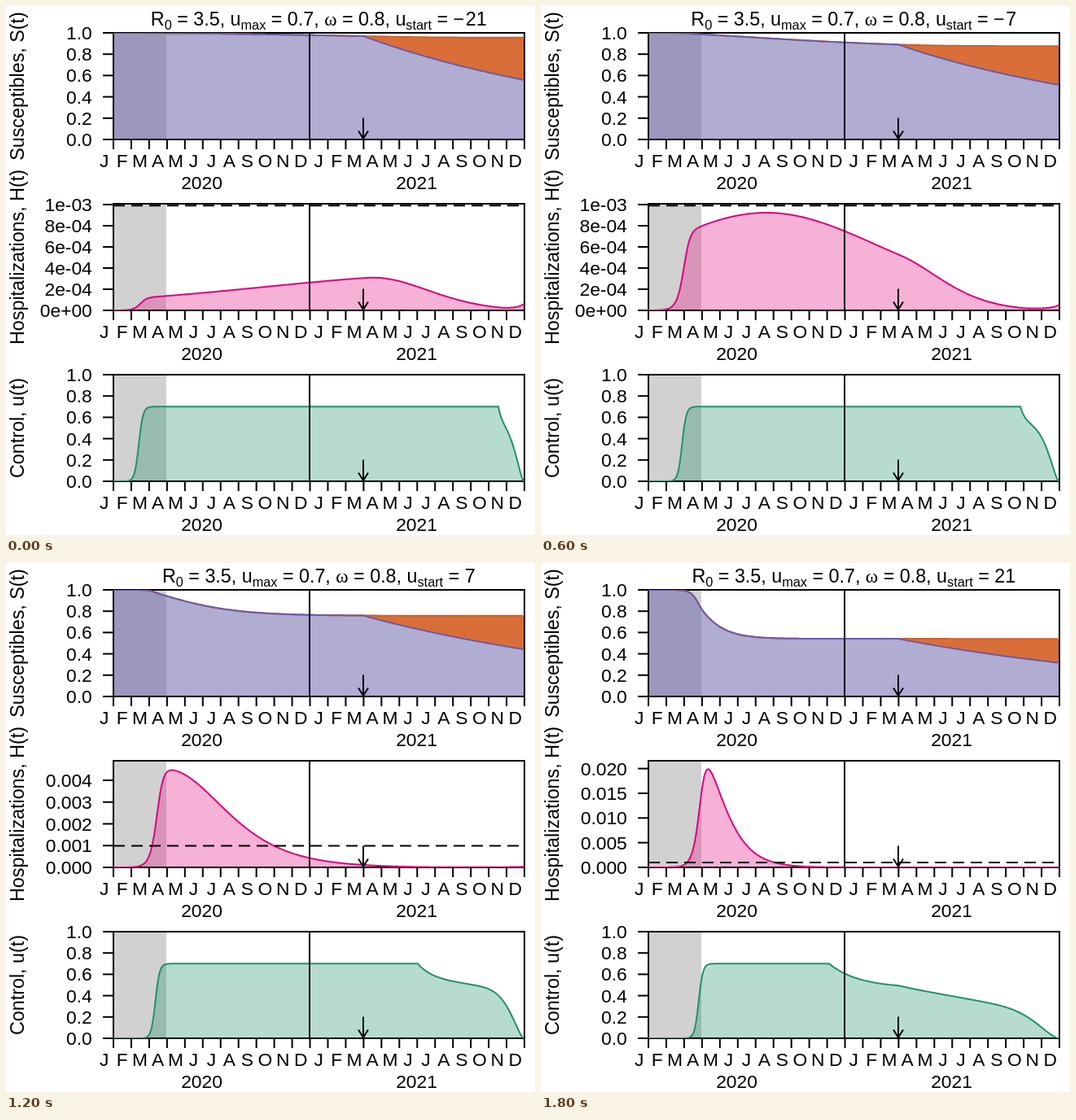
These frames come from a looping animation (650 by 650 pixels, 2100 ms). An HTML page with a canvas:

```html
<!DOCTYPE html>
<html lang="en">
<head>
<meta charset="utf-8">
<title>Epidemic control by start day</title>
<style>
  html, body { margin: 0; width: 100%; height: 100%; overflow: hidden; background: #fff; }
  canvas { display: block; }
</style>
</head>
<body>
<canvas id="stage" width="650" height="650"></canvas>
<script>
const ctx = document.getElementById('stage').getContext('2d');
const SANS = '"Liberation Sans", Arial, sans-serif';
const SERIF = '"Liberation Serif", Times, serif';
const LEFT = 132, RIGHT = 637, HEIGHT = 131, MONTH = (RIGHT - LEFT) / 23;
const NEW_YEAR = 373, VACCINE = 439, SHADE_END = 197;
const HOLD = 300;

// Model rates; times are in pixels along the x axis
const R0 = 3.5, U_MAX = .7, EFFICACY = .8, CAPACITY = .00099;
const LATENT = 2.6, INFECTIOUS = 7.7, STAY = 2.5, ADMITTED = .8;
const UPTAKE = .00272, SEED = 1.15e-6;

const axisOf = (inc, step, labels) => ({ labels, step, scale: step / inc });
const decimals = (digits, inc, count, step) =>
  axisOf(inc, step, Array.from({ length: count }, (_, i) => (i * inc).toFixed(digits)));
const unit = decimals(1, .2, 6, 26.2);
const fine = axisOf(.0002, 26, ['0e+00', '2e-04', '4e-04', '6e-04', '8e-04', '1e-03']);

// release: where the control starts to relax
const scenes = [
  { start: -21, release: 605, axis: fine },
  { start: -14, release: 602, axis: fine },
  { start: -7, release: 589, axis: fine },
  { start: 0, release: 558, axis: decimals(4, .0005, 5, 31) },
  { start: 7, release: 506, axis: decimals(3, .001, 5, 26.75) },
  { start: 14, release: 420, axis: decimals(3, .002, 6, 24.15) },
  { start: 21, release: 354, axis: decimals(3, .005, 5, 30.35) }
];

// Control rises as a logistic, then relaxes towards the level that holds
// infections steady, and closes to zero at the end of the period.
function controller({ start, release }) {
  const middle = 178.5 + start * 5.1 / 7;
  const fade = .13 * (RIGHT - release);
  let gap = null;
  return (x, open) => {
    if (x < release) return U_MAX / (1 + Math.exp((middle - x) / 2.6));
    const need = Math.max(0, 1 - 1 / (R0 * open));
    const left = Math.max(0, RIGHT - 1 - x);
    const close = 1 - Math.exp(-((left / (45 - 55 * need)) ** 1.4));
    if (gap === null) gap = U_MAX / close - need;
    return Math.min(U_MAX, close * (need + gap * Math.exp((release - x) / fade)));
  };
}

// Susceptible, protected, exposed, infectious and hospitalized shares
function simulate(scene) {
  const control = controller(scene), steps = 40, dt = 1 / steps;
  let s = 1, p = 0, i = SEED, e = .806 * SEED, h = .18 * SEED;
  Object.assign(scene, { free: [], all: [], hosp: [], control: [] });
  for (let n = 0; n <= (RIGHT - LEFT) * steps; n++) {
    const x = LEFT + n * dt;
    const open = s + (1 - EFFICACY) * p;
    const u = control(x, open);
    if (n % steps === 0) {
      scene.free.push(s * HEIGHT);
      scene.all.push((s + p) * HEIGHT);
      scene.hosp.push(h * scene.axis.scale);
      scene.control.push(u * HEIGHT);
    }
    const force = R0 * (1 - u) * i / INFECTIOUS;
    const given = x > VACCINE ? UPTAKE * s : 0;
    const onset = e / LATENT, removed = i / INFECTIOUS;
    s -= (force * s + given) * dt;
    p += (given - (1 - EFFICACY) * force * p) * dt;
    e += (force * open - onset) * dt;
    i += (onset - removed) * dt;
    h += (ADMITTED * removed - h / STAY) * dt;
  }
}
scenes.forEach(simulate);

function line(color, ...pts) {
  ctx.strokeStyle = color;
  ctx.beginPath();
  for (let i = 0; i < pts.length; i += 2) ctx.lineTo(pts[i], pts[i + 1]);
  ctx.stroke();
}

function text(str, x, y, size, align) {
  ctx.font = `${size}px ${SANS}`;
  ctx.textAlign = align;
  ctx.fillText(str, x, y);
}

function trace(heights, base) {
  ctx.beginPath();
  heights.forEach((h, i) => ctx.lineTo(LEFT + i, base - h));
}

function area(heights, base, color, floor) {
  trace(heights, base);
  for (let i = heights.length - 1; i >= 0; i--) ctx.lineTo(LEFT + i, base - (floor ? floor[i] : 0));
  ctx.fillStyle = color;
  ctx.fill();
}

function curve(heights, base, color) {
  trace(heights, base);
  ctx.strokeStyle = color;
  ctx.stroke();
}

function panel(top, name, axis, limit, fills, curves) {
  const base = top + HEIGHT;
  ctx.lineWidth = 2;
  ctx.fillStyle = '#d1d1d1';
  ctx.fillRect(LEFT, top, SHADE_END - LEFT, HEIGHT);
  fills(base);
  ctx.strokeStyle = '#000';
  ctx.strokeRect(LEFT, top, RIGHT - LEFT, HEIGHT);

  ctx.save();
  ctx.beginPath();
  ctx.rect(LEFT, top, RIGHT - LEFT, HEIGHT);
  ctx.clip();
  curves(base);
  ctx.restore();

  if (limit) {
    const y = base - limit * axis.scale;
    ctx.setLineDash([14, 8]);
    line('#000', LEFT, y, RIGHT, y);
    ctx.setLineDash([]);
  }
  line('#000', NEW_YEAR, top, NEW_YEAR, base);
  line('#000', VACCINE, base - 26.5, VACCINE, base - 1);
  line('#000', VACCINE - 6, base - 10.5, VACCINE, base - 1, VACCINE + 6, base - 10.5);

  ctx.fillStyle = '#000';
  axis.labels.forEach((label, i) => {
    const y = base - i * axis.step;
    line('#000', LEFT - 13, y, LEFT, y);
    text(label, 105.8, y + 8, 22.8, 'right');
  });
  [...'JFMAMJJASONDJFMAMJJASOND'].forEach((m, i) => {
    const x = LEFT + i * MONTH;
    line('#000', x, base, x, base + 12);
    text(m, x - 11.3, base + 34, 22.8, 'center');
  });
  text('2020', 240.5, base + 60.5, 22.8, 'center');
  text('2021', 504.5, base + 60.5, 22.8, 'center');

  ctx.save();
  ctx.translate(21.5, top + HEIGHT / 2);
  ctx.rotate(-Math.PI / 2);
  text(name, 0, 0, 23.3, 'center');
  ctx.restore();
}

function heading(start) {
  const run = (str, size = 23.3, dy = 0, family = SANS) => ({ str, dy, font: `${size}px ${family}` });
  const sub = str => run(str, 16.3, 5);
  const runs = [run('R'), sub('0'), run(' = 3.5, u'), sub('max'), run(' = 0.7, '),
    run('ω', 23.3, 0, SERIF), run(' = 0.8, u'), sub('start'), run(' = ')];
  if (start < 0) runs.push(run('−'), run(' ', 6));
  runs.push(run(String(Math.abs(start))));

  const width = r => { ctx.font = r.font; return ctx.measureText(r.str).width; };
  let x = 384.3 - runs.reduce((w, r) => w + width(r), 0) / 2;
  ctx.textAlign = 'left';
  ctx.fillStyle = '#000';
  for (const r of runs) {
    const w = width(r);
    ctx.fillText(r.str, x, 23.5 + r.dy);
    x += w;
  }
}

function draw({ start, axis, free, all, hosp, control }) {
  ctx.fillStyle = '#fff';
  ctx.fillRect(0, 0, 650, 650);
  heading(start);
  panel(33, 'Susceptibles, S(t)', unit, 0,
    base => {
      area(all, base, '#d96e38', free);
      area(free, base, 'rgba(113,104,173,.55)');
    },
    base => {
      curve(all, base, '#d0602a');
      curve(free, base, '#6a5ba8');
    });
  panel(243, 'Hospitalizations, H(t)', axis, CAPACITY,
    base => area(hosp, base, 'rgba(231,41,141,.36)'),
    base => curve(hosp, base, '#de007f'));
  panel(453, 'Control, u(t)', unit, 0,
    base => area(control, base, 'rgba(18,140,94,.3)'),
    base => curve(control, base, '#21916b'));
}

const origin = performance.now();
let shown = -1;
function tick() {
  const index = Math.floor((performance.now() - origin) / HOLD) % scenes.length;
  if (index !== shown) draw(scenes[shown = index]);
  requestAnimationFrame(tick);
}
tick();
</script>
</body>
</html>
```
